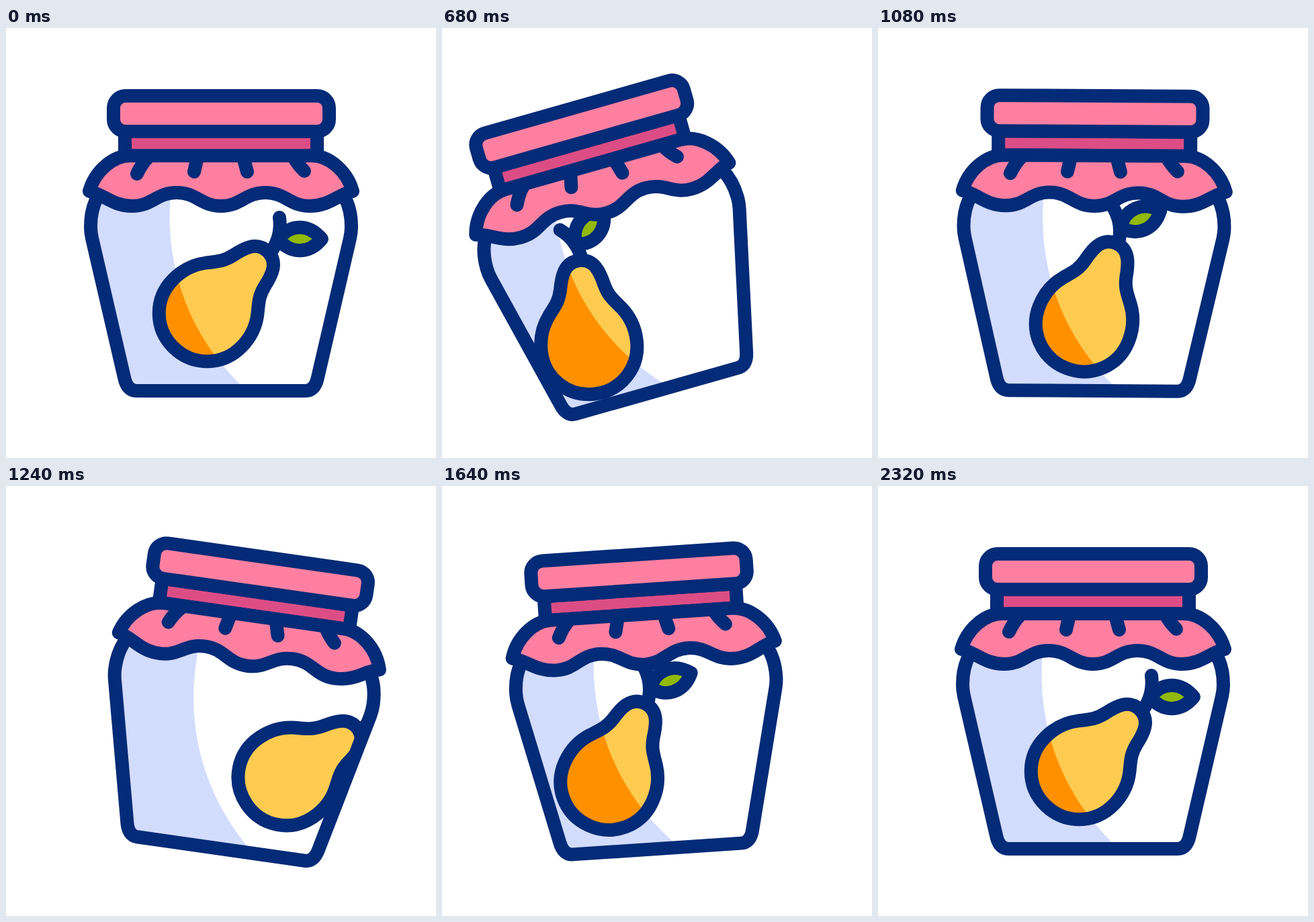
Animation of 640 by 640 pixels, one loop 2.4 s. Source, as an HTML page:

```html
<!DOCTYPE html>
<html lang="en">
<head>
<meta charset="utf-8">
<title>Swinging jam jar</title>
<style>
html, body { margin: 0; height: 100%; overflow: hidden; background: #fff; }
svg { display: block; width: 100vw; height: 100vh; }
.line { stroke: #042b77; stroke-width: 20; stroke-linecap: round; stroke-linejoin: round; }
</style>
</head>
<body>
<svg viewBox="0 0 640 640" fill="none">
  <defs>
    <path id="glass" d="M136 252Q126 270 126 296Q126 304 128 313L176 520Q180 540 194 540H446Q460 540 464 520L512 313Q514 304 514 296Q514 270 504 252"/>
    <path id="shade" d="M60 230H245V250C238 330 256 440 350 532V580H60Z"/>
    <path id="body" transform="translate(299.5 424.5) rotate(44.5)" d="M0 71.5C-40 71.5 -71.5 40 -71.5 0C-71.5 -22 -65 -38 -54 -52C-42 -67 -37 -72 -33 -88C-29 -107 -23 -128.5 0 -128.5C23 -128.5 29 -107 33 -88C37 -72 42 -67 54 -52C65 -38 71.5 -22 71.5 0C71.5 40 40 71.5 0 71.5Z"/>
    <clipPath id="inGlass"><use href="#glass"/></clipPath>
    <clipPath id="inPear"><use href="#body" class="pear"/></clipPath>
  </defs>
  <g id="jar">
    <g clip-path="url(#inGlass)">
      <use href="#shade" class="shadow" fill="#d2dcfd"/>
      <use href="#body" class="pear" fill="#fdcb50"/>
      <g clip-path="url(#inPear)"><use href="#shade" class="shadow" fill="#ff9100"/></g>
      <g class="pear line">
        <use href="#body"/>
        <path d="M394 334Q411 310 407 282"/>
        <path fill="#92b90a" d="M406 314C421 292 450 290 470 314C450 338 421 336 406 314Z"/>
      </g>
    </g>
    <g class="line">
      <use href="#glass"/>
      <path fill="#dd4d85" stroke-linejoin="miter" d="M177 154H463V190H177Z"/>
      <rect fill="#ff7fa1" x="160" y="101" width="321" height="53" rx="18"/>
      <path fill="#ff7fa1" d="M124 243C132 214 158 190 185 190H455C482 190 508 214 516 243C495 247 482 265 452 265S416 245 386 245S350 265 320 265S284 245 254 245S218 265 188 265S145 247 124 243Z"/>
      <path d="M212 192Q202 202 195 217M285 192L280 214M353 192L359 214M428 192Q434 203 444 213"/>
    </g>
  </g>
</svg>
<script>
const LOOP = 2400, STEP = 40;

// Each key: time in ms, then the values reached there.
const swing = [[200, 0], [800, -17.7], [1240, 8.1], [1680, -4.1], [2000, 2.1], [2320, 0]];
// x, y and turn of the pear inside the jar; it trails the swing.
const slide = [[280, 0, 0, 0], [880, -79, 32, -47.5], [1320, 119, -7, 8.5], [1760, -81, 15, -21.6], [2320, 0, 0, 0]];

const jar = document.getElementById('jar');
const pears = document.querySelectorAll('.pear');
const shadows = document.querySelectorAll('.shadow');

function valuesAt(keys, t) {
  const next = keys.findIndex(key => key[0] > t);
  if (next < 1) return keys[0].slice(1);
  const [t0, ...from] = keys[next - 1];
  const [t1, ...to] = keys[next];
  const s = (t - t0) / (t1 - t0);
  const ease = s * s * (3 - 2 * s);
  return from.map((v, i) => v + (to[i] - v) * ease);
}

function place(parts, transform) {
  for (const part of parts) part.setAttribute('transform', transform);
}

function draw(now) {
  const t = Math.floor(now % LOOP / STEP) * STEP;
  const [tilt] = valuesAt(swing, t);
  const [x, y, turn] = valuesAt(slide, t);
  place([jar], `rotate(${tilt} 320 540)`);
  // The shadow leans slightly against the tilt.
  place(shadows, `rotate(${-0.17 * tilt} 245 250)`);
  place(pears, `translate(${x} ${y}) rotate(${turn} 300 425)`);
}

const start = performance.now();
function tick() {
  draw(performance.now() - start);
  requestAnimationFrame(tick);
}
tick();
</script>
</body>
</html>
```
